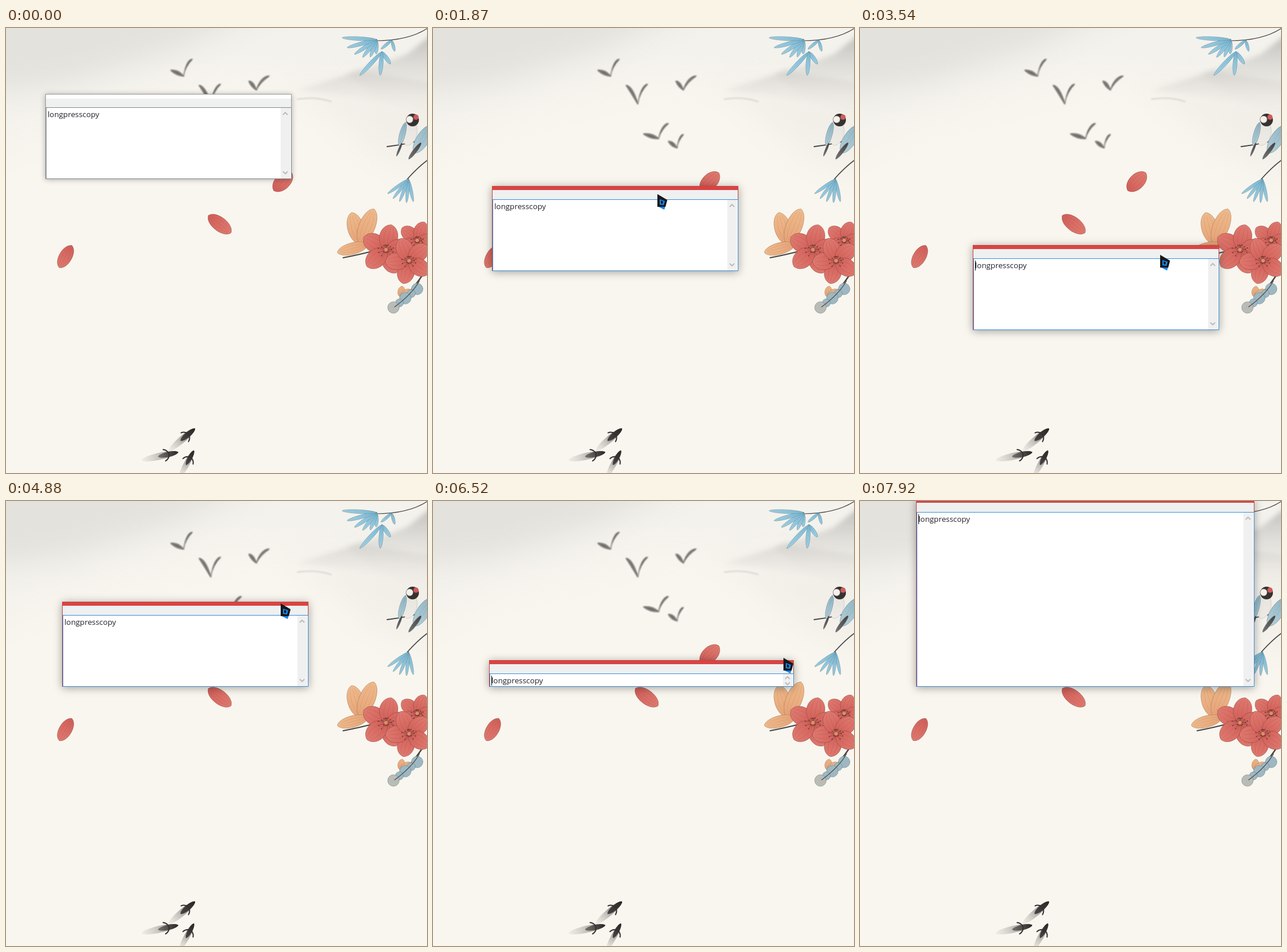
An HTML page with a canvas for the animation above (8000 ms loop, 728x769 px).

```html
<!DOCTYPE html>
<html lang="en">
<head>
<meta charset="utf-8">
<title>Dragging and resizing a note</title>
<style>
html, body { margin: 0; width: 100%; height: 100%; overflow: hidden; background: #f9f6ef; }
canvas { display: block; }
</style>
</head>
<body>
<canvas id="stage" width="728" height="769"></canvas>
<script>
const W = 728, H = 769, LOOP = 8000;
const stage = document.getElementById('stage').getContext('2d');
const backdrop = document.createElement('canvas');
backdrop.width = W;
backdrop.height = H;
const p = backdrop.getContext('2d');

const INK = '#484443';
const RED = { from: '#d15f58', to: '#e07a70', line: '#8f4a44', veins: 3 };
const ORANGE = { from: '#e6a377', to: '#efbb8c', line: '#a97b5a', veins: 3 };
const BLUE = { from: '#7dbbd7', to: '#a5d3e6', line: '#5d8797', veins: 1 };
const SLATE = { from: '#8fb4c4', to: '#b4d0d9', line: '#6b8794', veins: 2 };

// ---------- painting helpers ----------
const lerp = (a, b, f) => a + (b - a) * f;
const polar = (x, y, deg, r) => [x + r * Math.cos(deg * Math.PI / 180), y + r * Math.sin(deg * Math.PI / 180)];

function poly(c, pts, fill) {
  c.beginPath();
  pts.forEach(([x, y]) => c.lineTo(x, y));
  c.closePath();
  c.fillStyle = fill;
  c.fill();
}

function curve(a, bend, b, color, width) {
  p.beginPath();
  p.moveTo(...a);
  p.quadraticCurveTo(...bend, ...b);
  p.strokeStyle = color;
  p.lineWidth = width;
  p.stroke();
}

function dot(x, y, r, fill, line) {
  p.beginPath();
  p.arc(x, y, r, 0, 7);
  p.fillStyle = fill;
  p.fill();
  if (line) { p.strokeStyle = line; p.lineWidth = 0.6; p.stroke(); }
}

function soft(radius, paint) {
  p.save();
  p.filter = `blur(${radius}px)`;
  paint();
  p.restore();
}

// A leaf or petal along the axis a-b, bulging by w on both sides.
function leaf(a, b, w, { from, to, line, veins = 0 }) {
  const dx = b[0] - a[0], dy = b[1] - a[1], len = Math.hypot(dx, dy);
  const at = (f, s) => [a[0] + dx * f - dy / len * s, a[1] + dy * f + dx / len * s];
  const k = w * 1.33;
  p.beginPath();
  p.moveTo(...a);
  p.bezierCurveTo(...at(0.1, k), ...at(0.9, k), ...b);
  p.bezierCurveTo(...at(0.9, -k), ...at(0.1, -k), ...a);
  p.fillStyle = p.createLinearGradient(...a, ...b);
  p.fillStyle.addColorStop(0, from);
  p.fillStyle.addColorStop(1, to);
  p.fill();
  if (!line) return;
  p.strokeStyle = line;
  p.lineWidth = 0.6;
  p.stroke();
  p.globalAlpha = 0.4;
  for (let i = 0; i < veins; i++) {
    const s = (i - (veins - 1) / 2) * w * 0.5;
    curve(at(0.1, s * 0.4), at(0.5, s * 1.6), at(0.9, s * 0.5), line, 0.6);
  }
  p.globalAlpha = 1;
}

// n leaves turning from angle a0 to a1 while growing from length l0 to l1.
function fan(x, y, a0, a1, n, l0, l1, w, style) {
  for (let i = 0; i < n; i++) {
    const f = i / (n - 1);
    leaf([x, y], polar(x, y, lerp(a0, a1, f), lerp(l0, l1, f)), w, style);
  }
}

// ---------- backdrop ----------
function fade(y0, y1, color) {
  const g = p.createLinearGradient(0, y0, 0, y1);
  g.addColorStop(0, color);
  g.addColorStop(1, '#efede700');
  return g;
}

function paintMist() {
  p.fillStyle = '#f9f6ef';
  p.fillRect(0, 0, W, H);
  soft(24, () => {
    poly(p, [[-60, -60], [800, -60], [800, 130], [400, 85], [120, 160], [-60, 240]], '#f4f2ec');
    poly(p, [[500, 100], [800, 90], [800, 280], [640, 220]], '#f2efe9');
    poly(p, [[-60, -60], [500, -60], [300, 35], [110, 95], [-60, 118]], '#e3e2dd');
  });
  soft(4, () => {
    poly(p, [[590, 80], [655, 60], [692, 46], [745, 5], [745, 150], [640, 118]], fade(20, 145, '#c4c3c0'));
    poly(p, [[504, 108], [560, 90], [610, 74], [745, 95], [745, 150], [600, 118]], fade(50, 150, '#c6c4c0'));
  });
  soft(1, () => curve([504, 123], [535, 118], [562, 127], '#d6d4cf', 2));
}

// Two tapered wings that meet in a body.
function gull(left, right, [x, y]) {
  for (const tip of [left, right]) {
    const bx = lerp(tip[0], x, 0.6), by = lerp(tip[1], y, 0.15);
    p.beginPath();
    p.moveTo(...tip);
    p.quadraticCurveTo(bx, by - 3, x + 1, y);
    p.quadraticCurveTo(bx - 3, by + 8, ...tip);
    p.fillStyle = p.strokeStyle = '#6d6a68';
    p.lineWidth = 1.4;
    p.fill();
    p.stroke();
  }
}

function paintGulls() {
  soft(1.2, () => {
    gull([285, 73], [322, 54], [306, 83]);
    gull([334, 99], [371, 97], [353, 131]);
    gull([420, 92], [455, 83], [432, 107]);
    gull([364, 183], [407, 165], [389, 191]);
    gull([407, 196], [433, 184], [421, 207]);
  });
}

function paintPetals() {
  leaf([463, 281], [494, 250], 13, RED);
  leaf([350, 324], [389, 354], 12, RED);
  leaf([114, 376], [92, 414], 11, RED);
}

function paintBamboo() {
  curve([728, 1], [695, 22], [640, 22], INK, 1.2);
  fan(641, 20, 92, 183, 6, 25, 60, 3.2, BLUE);
  fan(650, 41, 55, 133, 3, 26, 56, 3.5, BLUE);
  fan(667, 21, 75, 140, 2, 20, 24, 2.5, BLUE);
  curve([728, 229], [712, 241], [694, 261], INK, 1.6);
  fan(696, 261, 78, 145, 5, 40, 44, 2.6, BLUE);
}

function paintFinches() {
  const dark = { from: '#44413f', to: '#74777a' };
  curve([659, 205], [700, 200], [728, 190], INK, 1.8);
  leaf([704, 162], [693, 203], 12, { from: '#e6e4df', to: '#efece6', line: '#c2bfba' });
  leaf([691, 163], [680, 204], 5, SLATE);
  leaf([685, 198], [675, 222], 2, dark);
  dot(703, 159, 11, '#37322f');
  dot(698, 158, 6.2, '#f4f1ec', INK);
  dot(709, 154, 4.5, '#cf5b5d');
  leaf([736, 168], [706, 216], 11, SLATE);
  leaf([718, 198], [696, 227], 3.5, dark);
}

// Five petals around a ring of stamens.
function bloom(x, y, r, tilt) {
  for (let i = 0; i < 5; i++) leaf([x, y], polar(x, y, tilt + i * 72, r), r * 0.36, RED);
  for (let i = 0; i < 17; i++) {
    const end = polar(x, y, i * 137.5, r * (0.22 + 0.1 * Math.sin(i * 5)));
    curve([x, y], [x, y], end, '#7b3b35', 0.6);
    dot(...end, 0.9, '#553029');
  }
  dot(x, y, 3, '#dc9168');
}

function paintFlowers() {
  fan(612, 373, -105, -68, 2, 56, 65, 14, ORANGE);
  leaf([626, 374], [573, 388], 10, ORANGE);
  curve([583, 397], [610, 392], [640, 384], INK, 2);
  curve([728, 413], [712, 445], [672, 482], INK, 2.5);
  bloom(711, 367, 34, -140);
  bloom(657, 383, 44, -150);
  bloom(697, 402, 41, 105);
  fan(682, 465, -80, -35, 2, 19, 22, 6, ORANGE);
  for (let i = 0; i < 5; i++) {
    dot(lerp(711, 670, i / 4), lerp(451, 483, i / 4), 7 + 3 * Math.cos(i * Math.PI / 2) ** 2, i < 4 ? '#9db8c2' : '#b9bcb6', '#728891');
  }
  curve([715, 437], [702, 460], [672, 482], INK, 1.2);
}

// A dark head with side fins and a washed-out tail.
function fish(head, tail, w, ink) {
  const at = f => [lerp(head[0], tail[0], f), lerp(head[1], tail[1], f)];
  const turn = Math.atan2(tail[1] - head[1], tail[0] - head[0]) * 180 / Math.PI;
  leaf(head, tail, w, { from: ink, to: 'rgba(190,187,182,.15)' });
  leaf(head, at(0.55), w * 0.75, { from: '#2a2626', to: ink });
  for (const side of [-1, 1]) {
    const root = at(0.25);
    curve(root, polar(...root, turn + side * 80, 8), polar(...root, turn + side * 50, 13), '#353130', 2);
  }
}

function paintFish() {
  soft(0.7, () => {
    fish([327, 692], [281, 731], 6, '#4b4645');
    fish([298, 733], [234, 747], 6, '#77736f');
    fish([325, 730], [300, 776], 5, '#4b4645');
  });
}

// ---------- motion ----------
const ramp = (t, a, b) => Math.min(1, Math.max(0, (t - a) / (b - a)));

// Stops are [time, x, y]; straight runs in between, held at both ends.
function glide(stops, t) {
  const i = stops.findIndex(s => s[0] > t);
  if (i === 0) return stops[0].slice(1);
  if (i < 0) return stops[stops.length - 1].slice(1);
  const a = stops[i - 1], b = stops[i], f = ramp(t, a[0], b[0]);
  return [Math.round(lerp(a[1], b[1], f)), Math.round(lerp(a[2], b[2], f))];
}

const NOTE = { w: 426, h: 147, bottom: 321 };
const DRAG_OUT = [[1010, 68, 114], [1330, 110, 228], [1600, 195, 283], [1870, 102, 273], [2270, 0, 150], [2420, -5, 146]];
const DRAG_BACK = [[2970, -5, 146], [3450, 240, 386], [3540, 195, 376], [3850, 97, 174]];
const STRETCH = [[5200, 523, 174], [5600, 545, 75], [6200, 575, 36], [6520, 624, 275], [6900, 636, 215], [7900, 682, -4]];

function noteAt(t) {
  const [l, top] = glide(t < 2970 ? DRAG_OUT : DRAG_BACK, t);
  if (t < 5200) return { l, t: top, r: l + NOTE.w, b: top + NOTE.h };
  const [r, edge] = glide(STRETCH, t);
  return { l, t: edge, r, b: NOTE.bottom };
}

function pointerAt(t, note) {
  if (t < 1010) {
    const f = ramp(t, 70, 840);
    return [lerp(548, 353, f), lerp(597, 128, f)];
  }
  if (t < 4090) {
    const f = ramp(t, 2570, 2970);
    return [note.l + lerp(286, 324, f), note.t + lerp(14, 17, f)];
  }
  if (t < 5200) {
    const f = ramp(t, 4090, 5200) ** 1.3;
    return [lerp(421, 505, f), lerp(191, 170, f)];
  }
  return [note.r - 18, note.t - 4 - 30 * ramp(t, 7500, 7900)];
}

// ---------- window and pointer ----------
function rect(x, y, w, h, color) {
  stage.fillStyle = color;
  stage.fillRect(x, y, w, h);
}

function chevron(x, y, dir) {
  stage.beginPath();
  stage.moveTo(x - 4, y + 2 * dir);
  stage.lineTo(x, y - 2 * dir);
  stage.lineTo(x + 4, y + 2 * dir);
  stage.strokeStyle = '#b9b9b9';
  stage.lineWidth = 1.8;
  stage.stroke();
}

function drawNote({ l, t, r, b }, active, hover, caret) {
  const w = r - l, box = t + 23, inner = b - box - 2, mid = (box + b) / 2;
  stage.save();
  stage.shadowColor = active ? 'rgba(0,0,0,.36)' : 'rgba(0,0,0,.3)';
  stage.shadowBlur = active ? 14 : 9;
  stage.shadowOffsetY = active ? 2 : 1;
  rect(l, t, w, b - t, active ? '#c94240' : '#9a9a9b');
  stage.restore();
  rect(l + 1, t + 1, w - 2, 7, active ? '#d94443' : '#ffffff');
  rect(l + 1, t + (active ? 7 : 8), w - 2, 16, '#eff0f0');
  rect(l + 1, box, w - 1, b - box, active ? '#3b8fd8' : hover ? '#7eb4ea' : '#83878e');
  rect(l + 2, box + 1, w - 3, inner, '#ffffff');
  rect(r - 19, box + 1, 17, inner, '#f0f0f0');
  chevron(r - 11, Math.min(t + 34, mid - 4), 1);
  chevron(r - 11, Math.max(b - 11, mid + 6), -1);

  stage.font = '13.3px "Open Sans", "Noto Sans", sans-serif';
  stage.fillStyle = '#22222c';
  stage.fillText('longpresscopy', l + 4, t + 40);
  if (caret) rect(l + 4, t + 27, 1, 17, '#000');
}

function drawPointer(x, y) {
  stage.save();
  stage.translate(Math.round(x), Math.round(y));
  poly(stage, [[4, 19], [17, 11], [12, 27], [2, 22]], '#1686e8');
  poly(stage, [[0, 0], [17, 10], [14, 22], [0, 22]], '#17181d');
  poly(stage, [[4, 9], [13, 12], [11, 19], [4, 18]], '#168cf0');
  poly(stage, [[6, 11], [10, 13], [9, 17], [6, 16]], '#111318');
  stage.restore();
}

function render(t) {
  const note = noteAt(t);
  const [x, y] = pointerAt(t, note);
  const active = t >= 1090;
  const hover = !active && x < note.r && y > note.t + 23 && y < note.b;
  const caret = active && Math.floor((t - 1090) / 530) % 2 === 0;
  stage.drawImage(backdrop, 0, 0);
  drawNote(note, active, hover, caret);
  if (t >= 70) drawPointer(x, y);
}

p.lineCap = p.lineJoin = 'round';
[paintMist, paintGulls, paintPetals, paintBamboo, paintFinches, paintFlowers, paintFish].forEach(paint => paint());

const begin = performance.now();
function tick() {
  render((performance.now() - begin) % LOOP);
  requestAnimationFrame(tick);
}
tick();
</script>
</body>
</html>
```
